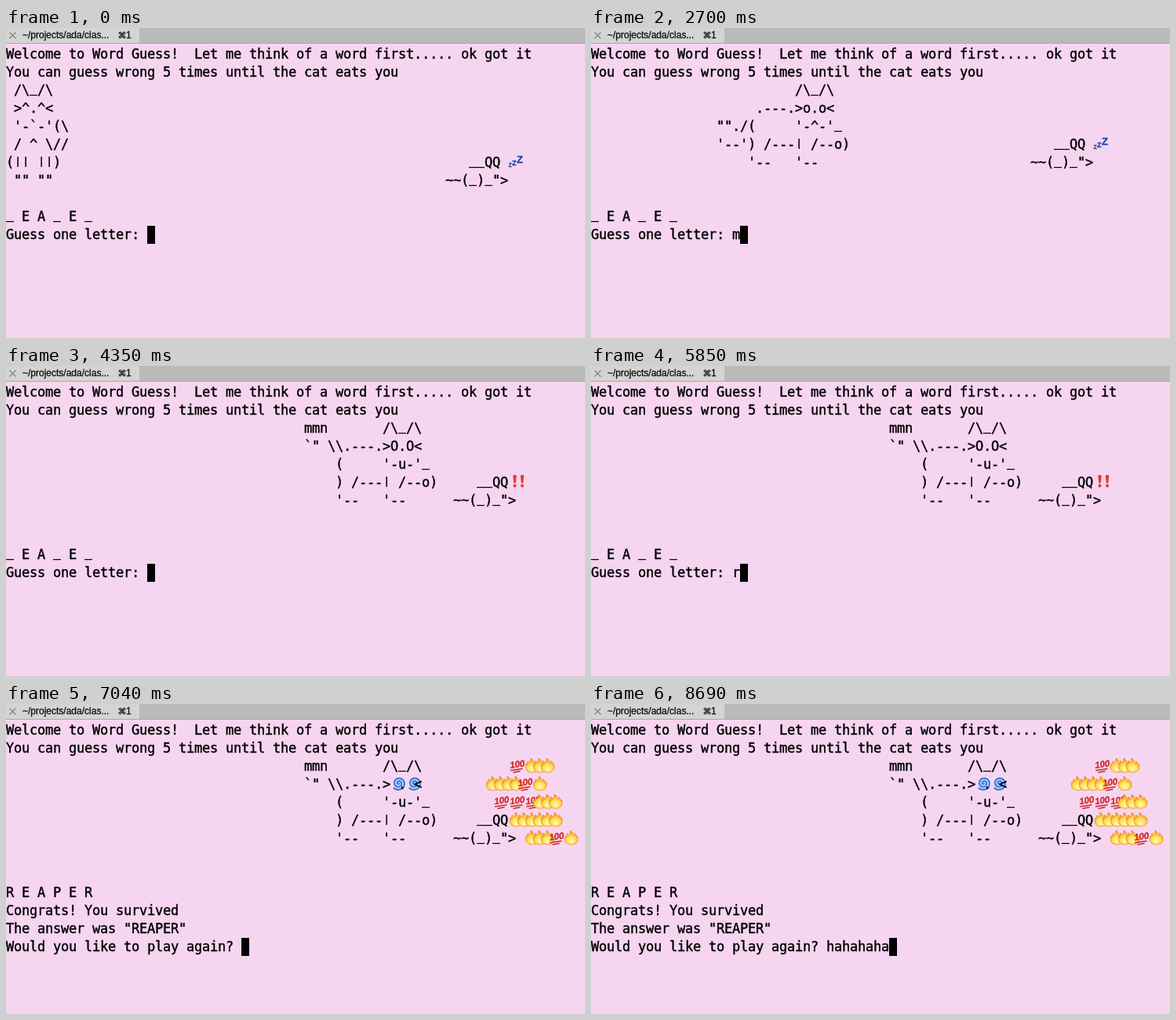
These frames come from a looping animation (738 by 395 pixels, 9.74 s). An HTML page with a canvas:

```html
<!DOCTYPE html>
<html lang="en">
<head>
<meta charset="utf-8">
<title>Word Guess</title>
<style>
  html, body { margin: 0; width: 738px; height: 395px; overflow: hidden; background: #f6d5f0; }
  canvas { display: block; }
</style>
</head>
<body>
<canvas id="stage" width="738" height="395"></canvas>
<script>
const ctx = document.getElementById('stage').getContext('2d');
const LOOP = 9740, COL = 10, ROW = 23, TOP = 22, BASELINE = 17;
const MONO = '17px "DejaVu Sans Mono", monospace';
const SANS = '"Liberation Sans", Arial, sans-serif';

const INTRO = [
  [0, 0, 'Welcome to Word Guess!  Let me think of a word first..... ok got it'],
  [0, 1, 'You can guess wrong 5 times until the cat eats you']
];
const ASKING = [[0, 9, '_ E A _ E _']];
const WON = [
  [0, 9, 'R E A P E R'],
  [0, 10, 'Congrats! You survived'],
  [0, 11, 'The answer was "REAPER"']
];
const GUESS = 'Guess one letter: ';

const mouse = (col, row, mood) => [[col + 3, row, '__QQ' + mood], [col, row + 1, '~~(_)_">']];

const sitting = (col, face, mouth) => [
  [col + 1, 2, '/\\_/\\'],
  [col + 1, 3, face],
  [col + 1, 4, mouth + '(\\'],
  [col + 1, 5, '/ ^ \\//'],
  [col, 6, '(|| ||)'],
  [col + 1, 7, '"" ""']
];

// col is the left edge of the head; tail pieces are [column, row, text]
const walking = (col, face, mouth, tail) => [
  [col, 2, '/\\_/\\'],
  [col - 5, 3, '.---.' + face],
  [col - 6, 4, '('],
  [col, 4, mouth + '_'],
  [col - 6, 5, ') /---| /--o)'],
  [col - 6, 6, "'--   '--"],
  ...tail
];

const raisedTail = [[38, 2, 'mmn'], [38, 3, '`" \\\\']];
const party = [
  [64, 2, '💯 🔥🔥🔥'],
  [61, 3, '🔥🔥🔥🔥💯 🔥'],
  [62, 4, '💯 💯 💯🔥🔥🔥'],
  [64, 5, '🔥🔥🔥🔥🔥🔥'],
  [66, 6, '🔥🔥🔥💯 🔥']
];

const SCENES = [
  { at: 0, prompt: GUESS, row: 10, typed: [[1200, 't']],
    art: [...sitting(0, '>^.^<', "'-`-'"), ...mouse(56, 6, ' 💤'), ...ASKING] },
  { at: 1500, prompt: GUESS, row: 10, typed: [[1800, 's']],
    art: [...walking(16, '>^.^<', "'-`-'", [[7, 5, '_//'], [6, 6, "\"--'"]]),
          ...mouse(56, 5, ' 💤'), ...ASKING] },
  { at: 2100, prompt: GUESS, row: 10, typed: [[2700, 'm']],
    art: [...walking(26, '>o.o<', "'-^-'", [[16, 4, '""./'], [16, 5, "'--'"]]),
          ...mouse(56, 5, ' 💤'), ...ASKING] },
  { at: 3600, prompt: GUESS, row: 10, typed: [[4050, 'd']],
    art: [...sitting(32, '>❤.❤ <', "'-^-'"), ...mouse(56, 6, ' ❗'), ...ASKING] },
  { at: 4350, prompt: GUESS, row: 10,
    typed: [[5850, 'r'], [6000, 're'], [6140, 'rea'], [6290, 'reap'], [6440, 'reape'], [6590, 'reaper']],
    art: [...walking(48, '>O.O<', "'-u-'", raisedTail), ...mouse(57, 5, '‼'), ...ASKING] },
  { at: 7040, prompt: 'Would you like to play again? ', row: 12,
    typed: [[8090, 'h'], [8240, 'ha'], [8390, 'haha'], [8540, 'hahaha'], [8690, 'hahahaha']],
    art: [...walking(48, '>🌀.🌀<', "'-u-'", raisedTail), ...mouse(57, 5, ''), ...party, ...WON] }
];

const HEART = new Path2D('M7.5 15.5C5 13 0 10.5 0 6.8C0 3 5.5 2.6 7.5 6C9.5 2.6 15 3 15 6.8C15 10.5 10 13 7.5 15.5Z');
const FLAME = new Path2D('M7.5 0C10.5 1.5 11.5 5 12 7.5C13.2 6.5 13.4 5 13 3.5C15.2 5 15.5 7 15.6 8.6C16.2 8.2 16.5 7.6 16.6 7' +
  'C18.4 11 17.6 18 9 18C.8 18 -.4 11 1.4 7.2C1.6 8 2 8.6 2.6 9C2.4 6.5 3 5 4.2 3.6C4.2 5 4.6 6 5.4 6.8C6.6 5 8 3 7.5 0Z');
const MARK = new Path2D('M3.2 1.5Q5.5 .2 7.8 1.5L6.7 11.3H4.3ZM7.6 14.6A2.1 2.1 0 1 1 3.4 14.6A2.1 2.1 0 1 1 7.6 14.6Z');
const UNDERLINES = new Path2D('M2 15.8L17.5 13.4M5.5 18.2L14.5 16.6');
const SWIRL = new Path2D();
for (let a = 0; a < 15; a += 0.2) {
  const r = a * 0.58;
  SWIRL.lineTo(10.5 + r * Math.cos(a), 9 + r * Math.sin(a));
}

function fill(path, color) {
  ctx.fillStyle = color;
  ctx.fill(path);
}

function stroke(path, color, width) {
  ctx.strokeStyle = color;
  ctx.lineWidth = width;
  ctx.stroke(path);
}

// The thin outline gives the text its slightly heavy smoothing
function label(text, x, y, font, color, weight = 0.3) {
  ctx.font = font;
  ctx.fillStyle = ctx.strokeStyle = color;
  ctx.lineWidth = weight;
  ctx.lineJoin = 'round';
  ctx.fillText(text, x, y);
  ctx.strokeText(text, x, y);
}

// Each glyph is drawn from the left of its cell, with the baseline at y = 16
const GLYPHS = {
  '_': () => ctx.fillRect(0, 16, 10, 1.2),
  '|': () => ctx.fillRect(4.4, 3, 1.5, 13),
  '❤': () => fill(HEART, '#000'),
  '❗': () => fill(MARK, '#e43b2d'),
  '‼': () => {
    ctx.translate(3, 0);
    fill(MARK, '#e43b2d');
    ctx.translate(9.5, 0);
    fill(MARK, '#e43b2d');
  },
  '💤': () => [[0.5, 16, 7], [5, 14, 9], [11, 11, 13]].forEach(([x, y, size]) =>
    label('Z', x, y, `bold ${size}px ${SANS}`, '#2047a4')),
  '🌀': () => {
    stroke(SWIRL, '#a9cdf3', 3);
    stroke(SWIRL, '#2f6fdc', 1.7);
  },
  '🔥': () => {
    const glow = ctx.createRadialGradient(9, 14, 1, 9, 12, 11);
    glow.addColorStop(0, '#fff6b0');
    glow.addColorStop(0.45, '#ffe04f');
    glow.addColorStop(0.8, '#fbb02c');
    glow.addColorStop(1, '#ee7d22');
    ctx.translate(1.5, 0);
    fill(FLAME, glow);
    stroke(FLAME, '#f08a24', 0.8);
  },
  '💯': () => {
    ctx.translate(1, 0);
    stroke(UNDERLINES, '#cf2529', 1.5);
    ctx.rotate(-0.13);
    label('100', 0, 13, `italic bold 11.5px ${SANS}`, '#cf2529');
  }
};

function write(col, row, text) {
  let x = col * COL;
  const base = TOP + row * ROW + BASELINE;
  for (const ch of text) {
    ctx.save();
    ctx.fillStyle = '#000';
    ctx.translate(x, base - 16);
    if (GLYPHS[ch]) GLYPHS[ch]();
    else label(ch, 0, 16, MONO, '#000', 0.4);
    ctx.restore();
    x += COL;
  }
}

function drawTabBar() {
  ctx.fillStyle = '#bababa';
  ctx.fillRect(0, 0, 738, 20);
  ctx.fillStyle = '#d4d4d4';
  ctx.fillRect(0, 0, 170, 20);
  ctx.fillStyle = '#a8a8a8';
  ctx.fillRect(0, 19, 738, 1);
  stroke(new Path2D('M4.5 5.5L12.5 13.5M12.5 5.5L4.5 13.5'), '#858585', 1.3);
  label('~/projects/ada/clas...', 21, 13, `12px ${SANS}`, '#111');
  label('⌘', 142.5, 13, '11px "DejaVu Sans", sans-serif', '#111');
  label('1', 153, 13, `12px ${SANS}`, '#111');
}

function draw(time) {
  const scene = SCENES.findLast(s => time >= s.at);
  const typed = scene.typed.findLast(([at]) => time >= at);
  const line = scene.prompt + (typed ? typed[1] : '');

  ctx.fillStyle = '#f6d5f0';
  ctx.fillRect(0, 0, 738, 395);
  drawTabBar();
  for (const piece of [...INTRO, ...scene.art]) write(...piece);
  write(0, scene.row, line);
  ctx.fillStyle = '#000';
  ctx.fillRect(line.length * COL, TOP + scene.row * ROW, COL, ROW);
}

const start = performance.now();
function tick() {
  draw((performance.now() - start) % LOOP);
  requestAnimationFrame(tick);
}
tick();
</script>
</body>
</html>
```
